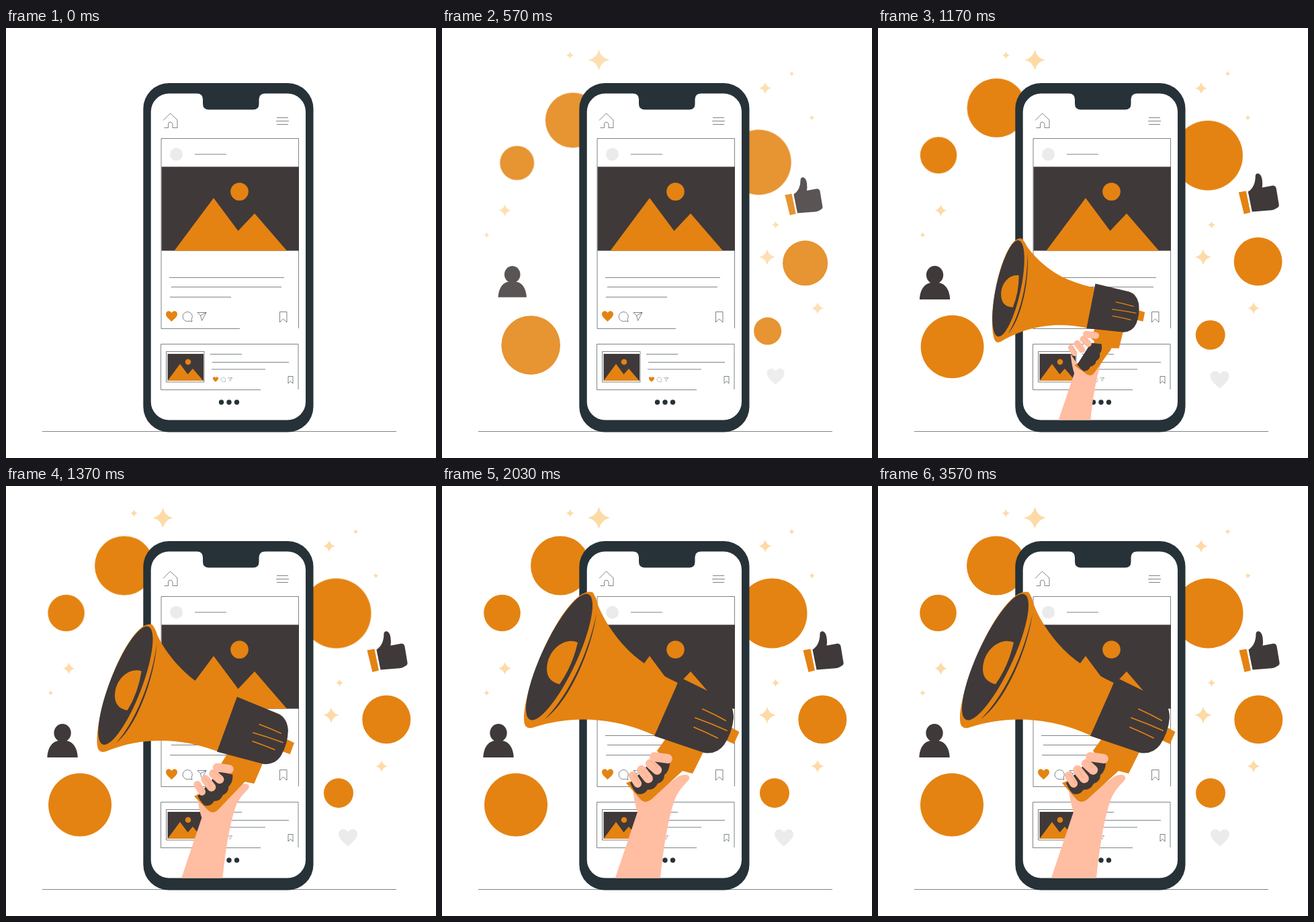
Recreate the animation shown at these times as an HTML page. Size 640 by 640 pixels, loop 3.61 s.

```html
<!DOCTYPE html>
<html lang="en">
<head>
<meta charset="utf-8">
<style>
  html, body { margin: 0; width: 100%; height: 100%; overflow: hidden; background: #fff; }
  svg { display: block; width: 100vw; height: 100vh; }
  .orange { fill: #e48312; }
  .dark { fill: #403939; }
  .navy { fill: #263238; }
  .pale { fill: #ebebeb; }
  .skin { fill: #ffbda2; }
  .line { fill: none; stroke: #263238; stroke-width: .6; }
  .fold { fill: none; stroke: #eb996e; stroke-width: .6; }
</style>
</head>
<body>
<svg viewBox="0 0 640 640">
  <defs>
    <path id="heart" d="M0 8C-4 4-8.5 1-8.5-3.2C-8.5-8-2.5-9.5 0-5C2.5-9.5 8.5-8 8.5-3.2C8.5 1 4 4 0 8Z"/>
    <path id="star" d="M0-1Q.19-.19 1 0Q.19.19 0 1Q-.19.19-1 0Q-.19-.19 0-1Z"/>
    <clipPath id="stage"><rect width="640" height="583.5"/></clipPath>
    <g id="actions">
      <use href="#heart" class="orange" x="246.5" y="429"/>
      <path class="line" d="M273 436A7 7 0 1 1 276 433.5L277 437ZM285 423.5H298L291.5 435.5L289.5 428ZM289.5 428L298 423.5"/>
    </g>
  </defs>

  <g id="stars" fill="#fddaa6"></g>

  <!-- data-from: offset from the resting place at the start -->
  <g id="badges">
    <g data-at="176,118.5" data-from="140,140"><circle class="orange" r="44"/></g>
    <g data-at="89.5,189" data-from="165,88"><circle class="orange" r="27.3"/></g>
    <g data-at="110,474.5" data-from="165,-18"><circle class="orange" r="47"/></g>
    <g data-at="491.5,189.5" data-from="-151,77"><circle class="orange" r="52"/></g>
    <g data-at="566.3,347.5" data-from="-191,18"><circle class="orange" r="36"/></g>
    <g data-at="495,457" data-from="-77,-44"><circle class="orange" r="22"/></g>
    <g data-at="84,379" data-from="154,-11">
      <ellipse class="dark" cy="-11.5" rx="12.7" ry="13.5"/>
      <path class="dark" d="M-22.7 25C-22 9-14 0-4 0H4C14 0 22 9 22.7 25Z"/>
    </g>
    <g data-at="567.5,246.5" data-from="-217,29">
      <path class="orange" d="M-30-2L-19-4L-12.5 28L-22 30.500Z"/>
      <path class="dark" d="M-16-3Q-5-10-5-27Q-4-31 0-30Q4-28 5-21Q6-14 5-9L21-12Q25-12 26-8L30 16Q31 20 26 22Q22 25 15 25L-10 27Z"/>
    </g>
    <g data-at="509,523.5" data-from="-92,-37"><use href="#heart" class="pale" transform="scale(1.64)"/></g>
  </g>

  <path class="line" d="M54 600.5H581"/>

  <!-- phone -->
  <rect class="navy" x="204.3" y="82" width="253.2" height="519.5" rx="38"/>
  <rect x="215.7" y="97.5" width="230.3" height="486" rx="27" fill="#fff"/>
  <path class="navy" d="M284 97Q293 98 293 106V113Q293 121.5 302 121.5H368Q376.5 121.5 376.5 113V106Q376.5 98 386 97Z"/>
  <path class="line" d="M234 137.5L244.5 127L255 137V148.5H248V143Q247 140 244.5 140Q241.5 140 241.5 143V148.5H235.5M403 133.5H420M402 138.5H421M403 143.5H420"/>

  <!-- large post -->
  <path class="line" d="M348 447.5H231V164.5H435.5V447"/>
  <circle class="pale" cx="253.5" cy="188" r="9.5"/>
  <path class="line" d="M281 188H328M243 371.5H414M246 385.5H410M244 400.5H335"/>
  <rect class="dark" x="231.5" y="206.5" width="204.5" height="125"/>
  <circle class="orange" cx="347.5" cy="243.5" r="13.3"/>
  <path class="orange" d="M250.5 331.5L309 253L345.5 302L370 276L418 331.5Z"/>
  <use href="#actions"/>
  <path class="line" d="M407.5 422.5H418V438L412.5 433L407.5 438Z"/>

  <!-- small post -->
  <path class="line" d="M379 538.5H230.5V470.5H435V538M238.5 481.5H295V527H238.5ZM304 485.5H351M307 497.5H421M306 508H386"/>
  <rect class="dark" x="240.5" y="485" width="53.5" height="40"/>
  <circle class="orange" cx="271" cy="497" r="4.3"/>
  <path class="orange" d="M240.5 525L259 500L270.5 515.5L278 507L293.5 525Z"/>
  <use href="#actions" transform="translate(193.6 317) scale(.48)"/>
  <path class="line" d="M420 518.5H427V529L423.5 525.5L420 529Z"/>
  <g class="navy"><circle cx="320.5" cy="557" r="3.7"/><circle cx="332" cy="557" r="3.7"/><circle cx="343.5" cy="557" r="3.7"/></g>

  <!-- hand with megaphone: the whole grows, the megaphone also turns -->
  <g clip-path="url(#stage)"><g id="hand">
    <path class="skin" d="M283 444Q286 472 291 485L258 583L222 690H306L325 583Q333 505 346 468Q350 455 366 439Q371 433 365 430Q355 428 344 438L300 470Z"/>
    <g id="megaphone">
      <path class="orange" d="M333 376L389 396L373 428L358 424L312 466Q302 474 295 466L274 442L310 428L326 402L320 394Z"/>
      <path class="dark" d="M280 442Q284 452 290 458Q300 461 306 452Q316 453 321 443Q331 440 331 430Q339 424 339 411L318 404Z"/>
      <path class="orange" d="M208 161Q216 156 224 158Q229 164 232 177C245 210 273 245 301 264Q325 281 351 293L318 372C270 350 205 336 134 360Q122 362 122 347C121 306 165 190 208 161Z"/>
      <ellipse class="dark" rx="26" ry="103" transform="translate(174.5 254.5) rotate(25)"/>
      <path class="orange" d="M202 233C184 224 156 243 156 273C156 286 165 293 175 295Q194 268 202 233Z"/>
      <path class="dark" d="M230 190C222 246 189 321 153 347C185 315 216 256 230 190Z"/>
      <path class="orange" d="M425 356L442.5 366L434.5 384L417 376Z"/>
      <path class="dark" d="M354.5 285L420 317Q434 325 434 345Q432 367 420 385Q409 400 390 397L316 372Z"/>
      <path d="M388 332Q406 340 422 349M377 345Q402 354 424 364M375 359Q394 367 410 375" fill="none" stroke="#e48312" stroke-width="1.8" stroke-linecap="round"/>
    </g>
    <g class="skin">
      <rect x="-17" y="-7" width="34" height="14" rx="7" transform="translate(326 404.5) rotate(8)"/>
      <rect x="-14" y="-7" width="28" height="14" rx="7" transform="translate(315 418) rotate(42)"/>
      <rect x="-15" y="-7" width="30" height="14" rx="7" transform="translate(302 429) rotate(52)"/>
      <rect x="-13" y="-6" width="26" height="12" rx="6" transform="translate(287.5 437) rotate(58)"/>
    </g>
    <path class="fold" d="M309 409Q316 411 321 420M295 420Q302 426 306 435M284 429Q292 435 294 443"/>
  </g></g>
</svg>
<script>
const LOOP = 3610;
const byId = id => document.getElementById(id);
const clamp = v => Math.min(1, Math.max(0, v));
const cubicInOut = p => p < .5 ? 4 * p ** 3 : 1 - 4 * (1 - p) ** 3;
const pair = text => text.split(',').map(Number);

// centre x, centre y, radius
const starData = [
  [190.5, 40.5, 6], [233.5, 47.5, 16.5], [481, 89.5, 9.5], [520.5, 68, 4.5], [550.5, 133.5, 4.5],
  [93.5, 271.5, 9.5], [66.5, 308, 4.5], [496.5, 293, 6], [484, 341, 12.5], [559, 417, 9.5]
];
const stars = starData.map(([x, y, r]) => {
  const node = document.createElementNS('http://www.w3.org/2000/svg', 'use');
  node.setAttribute('href', '#star');
  byId('stars').append(node);
  return { node, x, y, r };
});
const badges = [...byId('badges').children].map(node =>
  ({ node, at: pair(node.dataset.at), from: pair(node.dataset.from) }));

function draw(t) {
  // badges spread out from behind the phone
  const rest = (1 - clamp(t / 1727)) ** 5;
  for (const { node, at, from } of badges) {
    const [x, y] = at.map((v, i) => v + from[i] * rest);
    node.setAttribute('transform', `translate(${x} ${y}) scale(${1 - rest / 2})`);
  }
  byId('badges').setAttribute('opacity', 1 - rest);

  const pulse = .75 + .25 * Math.cos((t - 485) / 780 * 2 * Math.PI);
  for (const { node, x, y, r } of stars)
    node.setAttribute('transform', `translate(${x} ${y}) scale(${r * pulse})`);
  byId('stars').setAttribute('opacity', 1 - rest);

  // the hand grows from the bottom of the screen while the megaphone tilts up
  const grow = cubicInOut(clamp((t - 327) / 1447));
  byId('hand').setAttribute('visibility', t > 580 ? 'visible' : 'hidden');
  byId('hand').setAttribute('transform', `translate(295 585) scale(${grow}) translate(-295 -585)`);
  byId('megaphone').setAttribute('transform', `rotate(${-44 * (1 - grow)} 400 378)`);
}

function tick(now) {
  draw(now % LOOP);
  requestAnimationFrame(tick);
}
draw(0);
requestAnimationFrame(tick);
</script>
</body>
</html>
```
